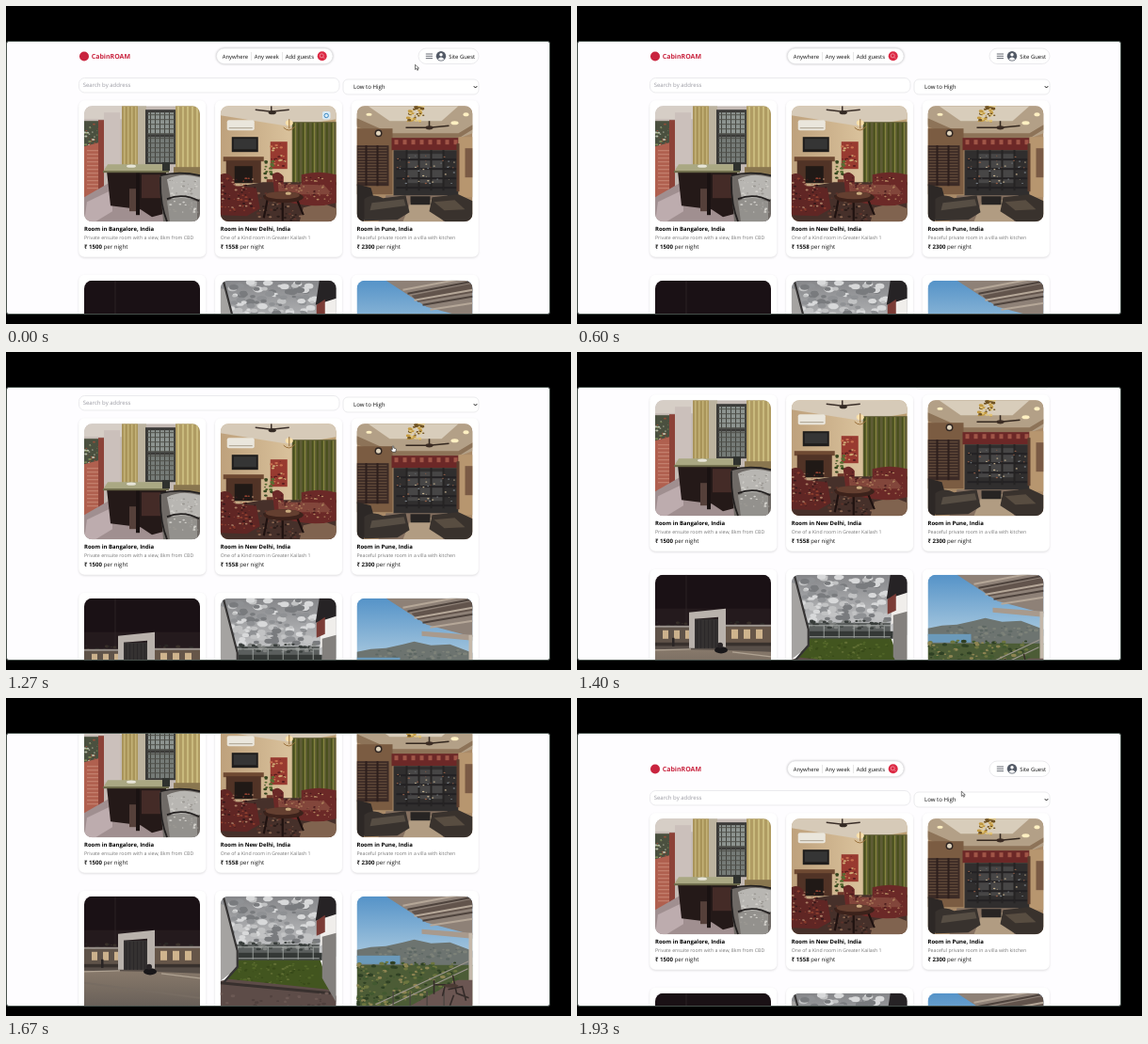
An HTML page that plays this animation: 600x338 px, repeating every 2000 ms.

```html
<!DOCTYPE html>
<html lang="en">
<head>
<meta charset="utf-8">
<title>Room listings</title>
<style>
html, body { margin: 0; width: 100%; height: 100%; overflow: hidden; background: #000; }
svg { display: block; width: 600px; height: 338px; }
text { font-family: "Open Sans", "Noto Sans", sans-serif; font-size: 6.1px; fill: #111; white-space: pre; text-rendering: geometricPrecision; }
.brand { font-size: 7px; font-weight: 700; fill: #c9243f; }
.nav { font-size: 5.9px; }
.hint { font-size: 6px; fill: #9a9aa2; }
.title { font-weight: 700; font-size: 5.95px; fill: #000; }
.note { font-size: 5.2px; fill: #777; }
.price tspan { font-weight: 700; }
.box { fill: #fff; stroke: #e2e2e6; stroke-width: .7; }
.soft { filter: drop-shadow(0 .7px 1px rgba(0, 0, 0, .25)); }
.card { fill: #fff; filter: drop-shadow(0 1px 1.2px rgba(0, 0, 0, .13)); }
</style>
</head>
<body>
<svg viewBox="0 0 600 338">
  <defs>
    <clipPath id="view"><rect x="1" y="38" width="576" height="289" rx="2"/></clipPath>
    <clipPath id="photo"><rect width="123" height="123" rx="8.5"/></clipPath>
    <linearGradient id="ground" x2="0" y2="1"><stop stop-color="#8a7b6c"/><stop offset="1" stop-color="#645c56"/></linearGradient>
    <linearGradient id="clouds" x2="0" y2="1"><stop stop-color="#858689"/><stop offset=".6" stop-color="#b0b1b3"/><stop offset="1" stop-color="#cfd0d1"/></linearGradient>
    <linearGradient id="blue" x2="0" y2="1"><stop stop-color="#5593c8"/><stop offset="1" stop-color="#a9c9df"/></linearGradient>
    <linearGradient id="cream" x2="1" y2="0"><stop stop-color="#bea17c"/><stop offset=".6" stop-color="#d9c19b"/><stop offset="1" stop-color="#b89b6e"/></linearGradient>
  </defs>
  <rect width="600" height="338"/>
  <rect x=".5" y="37.5" width="577" height="290" rx="2.5" fill="#fefdff" stroke="#46504b"/>
  <g clip-path="url(#view)">
    <g id="page">
      <circle cx="83" cy="53.5" r="5" fill="#c9243f"/>
      <text class="brand" x="90.7" y="56">CabinROAM</text>
      <rect class="box soft" x="223.5" y="45" width="123.5" height="16.5" rx="8.2"/>
      <path d="M260.5 49v9M293.5 49v9" stroke="#ddd" stroke-width=".7"/>
      <text class="nav" x="229.7" y="55.5">Anywhere</text>
      <text class="nav" x="263.7" y="55.5">Any week</text>
      <text class="nav" x="296.7" y="55.5">Add guests</text>
      <circle cx="335.7" cy="53.3" r="5" fill="#dc2944"/>
      <g fill="none" stroke="#f6a9b3" stroke-width=".7"><circle cx="335.3" cy="52.8" r="2"/><path d="M336.8 54.3l1.6 1.6"/></g>
      <rect class="box" x="438" y="45" width="64" height="16.5" rx="8.2"/>
      <path d="M445.8 51h7.2M445.8 53.3h7.2M445.8 55.6h7.2" stroke="#444a55" stroke-width=".8"/>
      <circle cx="462" cy="53.3" r="5.2" fill="#535a66"/>
      <circle cx="462" cy="51.7" r="1.7" fill="#fff"/>
      <path d="M458.6 56.4q3.4-3.8 6.8 0q-3.4 2.8-6.8 0" fill="#fff"/>
      <text class="nav" x="470.3" y="55.5">Site Guest</text>
      <rect class="box" x="77.5" y="76.5" width="276.5" height="15.5" rx="6"/>
      <text class="hint" x="81.7" y="86.4">Search by address</text>
      <rect class="box" x="358" y="78" width="144" height="16" rx="5"/>
      <text x="369" y="88.2">Low to High</text>
      <path d="M496.8 85.2l1.7 1.8 1.7-1.8" fill="none" stroke="#111" stroke-width="1"/>
      <g id="cards"></g>
      <g id="hover">
        <rect x="336" y="112" width="8.5" height="8.5" rx="2" fill="#d9eaf5"/>
        <circle cx="340.2" cy="116.5" r="2.2" fill="none" stroke="#3b88c0"/>
      </g>
    </g>
    <path id="arrow" d="M0 0v5.2l1.3-1.1 1 2 .9-.4-.9-2h1.7z" fill="#fff" stroke="#222" stroke-width=".6"/>
    <path id="hand" d="M-.7.6q.7-1.2 1.4 0v2l2.2.6q.7.3.5 1.2l-.7 2.4h-3.2l-2-2.6q.2-1 1.8 0z" fill="#fff" stroke="#222" stroke-width=".6"/>
  </g>
</svg>
<script>
const $ = id => document.getElementById(id);
const LOOP = 2000, STEPS = 30;

let seed = 7;
const rand = () => (seed = seed * 16807 % 2147483647) / 2147483647;

// Markup helpers for the room pictures, all in a 123 px square
const rect = (fill, x, y, w, h, rx = 0) =>
  `<rect x="${x}" y="${y}" width="${w}" height="${h}" rx="${rx}" fill="${fill}"/>`;
const shape = (fill, d) => `<path d="${d}" fill="${fill}"/>`;
const line = (stroke, d, w = 1) => `<path d="${d}" fill="none" stroke="${stroke}" stroke-width="${w}"/>`;
const oval = (fill, x, y, rx, ry = rx) => `<ellipse cx="${x}" cy="${y}" rx="${rx}" ry="${ry}" fill="${fill}"/>`;
const stripes = (fill, x, y, w, h, gap, size = 1) => {
  let out = '';
  for (let i = x; i < x + w; i += gap) out += rect(fill, i, y, size, h);
  return out;
};
const bars = (fill, x, y, w, h, gap, size = 1) => {
  let out = '';
  for (let i = y; i < y + h; i += gap) out += rect(fill, x, i, w, size);
  return out;
};
const specks = (fills, n, x, y, w, h, size) => {
  let out = '';
  for (let i = 0; i < n; i++) {
    const s = size * (.5 + rand());
    out += oval(fills[i % fills.length], x + rand() * w, y + rand() * h, s, s * .6);
  }
  return out;
};

const study = () => [
  rect('#c4bab4', 0, 0, 123, 123), rect('#d6cec6', 0, 0, 45, 14),
  rect('#4a503f', 0, 16, 17, 32), specks(['#7d8a58', '#b9bda9', '#934e39'], 30, 0, 18, 15, 28, 1.2),
  shape('#b0604f', 'M0 43L15 39L21 94L0 98z'), bars('#c98775', 3, 47, 14, 42, 4, 1),
  rect('#8c4238', 15, 15, 6, 74), rect('#cbc0bb', 21, 7, 17, 57),
  shape('#a08f90', 'M0 97L26 82H90V123H0z'), shape('#bdacae', 'M3 102L30 89V112L12 123H0z'),
  rect('#a9945a', 40, 0, 17, 64), stripes('#c3b177', 42, 0, 14, 64, 4, 1.5), rect('#bcb39f', 57, 0, 9, 63),
  rect('#3b3a38', 65, 4, 33, 58), rect('#8d9490', 68, 7, 27, 23), rect('#757b77', 68, 33, 27, 27),
  stripes('#444540', 70, 6, 26, 55, 5), bars('#50514b', 67, 9, 29, 50, 5),
  rect('#b09c63', 97, 0, 26, 75), stripes('#c9ba7d', 99, 0, 23, 75, 5, 2), rect('#89764f', 95, 65, 28, 12),
  shape('#241918', 'M24 69H87V114L72 118L60 110L28 106z'), rect('#442b27', 61, 73, 22, 25),
  rect('#55403a', 48, 88, 7, 24), rect('#1a1212', 55, 69, 4, 47),
  shape('#aaa883', 'M25 62H84L90 70H20z'), rect('#6a6848', 20, 69, 70, 2),
  oval('#e7e5d8', 50, 64, 5, 1.6), rect('#2f322e', 83, 60, 8, 9),
  shape('#6f6a66', 'M80 75Q95 69 123 73V123H84z'),
  shape('#b8b6b2', 'M88 78Q103 70 123 76V99H92z'), shape('#93918d', 'M88 101Q104 94 120 102V123H91z'),
  specks(['#d1cfca', '#9b9893'], 60, 91, 79, 30, 34, 1.1),
  line('#221f1f', 'M81 75Q80 103 88 123M81 74Q101 69 123 74M88 99Q105 92 122 101', 1.8)
];

const lounge = () => [
  rect('url(#cream)', 0, 0, 123, 123), shape('#d6cab8', 'M0 0H123V14L75 22L0 10z'),
  line('#3b2f29', 'M37 4L54 6L73 4M54 0V8', 1.5), oval('#332923', 55, 7, 4, 2),
  rect('#eae6dc', 7, 15, 29, 11, 2), rect('#a99e8d', 9, 23, 25, 1),
  rect('#1f1d1c', 12, 33, 28, 16), rect('#353535', 14, 35, 24, 11),
  rect('#6e4932', 3, 54, 43, 5), rect('#513326', 6, 58, 37, 24), rect('#201916', 15, 64, 19, 18),
  rect('#983a30', 53, 38, 18, 29), specks(['#c8704f', '#5a1d1e', '#cda873'], 24, 54, 40, 15, 24, 1.2),
  rect('#5e5c35', 76, 17, 47, 67), stripes('#484f1c', 77, 18, 45, 66, 5, 2), stripes('#85843f', 79, 18, 42, 65, 10, 1.4),
  oval('#f7dfab', 73, 18, 4, 3), line('#99713d', 'M67 23Q73 29 79 22M73 14V24'),
  specks(['#35461f', '#586c32'], 24, 47, 58, 9, 20, 1.4), rect('#6f382a', 49, 78, 7, 9),
  shape('#46302a', 'M0 89L45 81H123V123H0z'), shape('#80634f', 'M88 108L108 103L123 109V123H84z'),
  specks(['#2a1d1a', '#8a6751', '#5b322a'], 70, 20, 92, 66, 30, 1.4),
  shape('#6b2927', 'M55 73Q61 67 67 75V84H86V73Q104 68 123 73V103Q95 111 58 98z'),
  shape('#82463b', 'M61 83L110 84L119 94L62 94z'),
  specks(['#a06a50', '#481b1d', '#b1875f'], 80, 59, 76, 60, 25, 1),
  shape('#602624', 'M0 73Q12 68 16 85L38 87L42 109L28 117L0 116z'),
  specks(['#ab8066', '#35191a', '#91402f'], 75, 0, 77, 37, 36, 1.1),
  line('#1f1210', 'M50 99L46 119M81 99L88 116M66 100V122', 2.2),
  oval('#3c221b', 67, 97, 21, 6), oval('#643f30', 66, 95, 18, 4), oval('#cbad80', 72, 93, 3, 1.6)
];

const hall = () => [
  rect('#a98a68', 0, 0, 123, 123), shape('#b3a087', 'M0 0H123V29L104 36H36L0 20z'),
  shape('#d8cdbb', 'M12 0H108L90 16H35z'), shape('#8d7358', 'M0 13L36 29H108L123 20V25L107 35H36L0 22z'),
  oval('#fff0c2', 13, 9, 3, 1.5), oval('#fff0c2', 104, 18, 4, 2), oval('#fff0c2', 116, 9, 3, 2),
  rect('#7b5c42', 0, 24, 38, 70),
  rect('#3c2b26', 0, 42, 34, 43), bars('#69513f', 1, 44, 31, 38, 3), stripes('#2d1f1c', 9, 42, 20, 43, 12, 2),
  oval('#302622', 23, 29, 4), oval('#ded2bb', 23, 29, 2.5),
  rect('#6c2827', 37, 34, 71, 13), stripes('#a05547', 40, 36, 66, 5, 9, 4),
  rect('#302e2e', 39, 47, 69, 49), rect('#474646', 53, 51, 39, 31),
  bars('#232123', 42, 56, 64, 34, 10, 2), stripes('#252323', 52, 47, 52, 43, 13, 2),
  specks(['#c4b290', '#767d83', '#8f5d47'], 45, 43, 52, 61, 31, .9),
  rect('#b7966f', 108, 33, 15, 64), rect('#5d3e2e', 106, 40, 3, 51), rect('#7a5a45', 115, 45, 8, 31),
  line('#342820', 'M52 23L77 23L98 21M77 16V25', 1.6), oval('#3b2c24', 77, 23, 4, 2),
  specks(['#6f5222', '#c39a41', '#e0c479'], 42, 54, 0, 18, 17, 1.6),
  shape('#857060', 'M31 95H96L114 123H23z'), shape('#b19c82', 'M58 100H82L92 123H49z'),
  shape('#2d2826', 'M0 83L15 87L19 101L7 123H0z'),
  shape('#38322e', 'M8 99Q17 92 28 98L52 95L56 113L43 121L8 122z'), shape('#574e44', 'M16 103L50 99L52 106L14 111z'),
  shape('#39322d', 'M80 97L108 94L123 101V123H94L77 112z'), shape('#584d41', 'M82 102L104 100L115 110L93 111z'),
  shape('#272423', 'M57 96H78V105H57z')
];

const gate = () => [
  rect('#1a1115', 0, 0, 123, 123), shape('#241a1d', 'M0 36H123V60H0z'), line('#302629', 'M33 0V56', .8),
  specks(['#292624', '#382f29'], 36, 0, 50, 123, 7, 1.8),
  rect('#5f5349', 0, 56, 40, 20), rect('#665649', 73, 55, 50, 20),
  stripes('#cbb18c', 8, 59, 30, 9, 12, 6), stripes('#cfb48d', 81, 58, 36, 10, 13, 7),
  rect('#9b938c', 0, 54, 40, 2), rect('#9f9790', 73, 53, 50, 2), rect('#38312d', 0, 72, 123, 5),
  rect('url(#ground)', 0, 76, 123, 47), shape('#574e48', 'M0 76H123V82L68 80L0 79z'),
  line('#b0a393', 'M0 80L38 79M82 82L123 87', 1.2), line('#776c62', 'M0 92L123 108', 2),
  shape('#b9b2ac', 'M36 40L75 36V77H67V45L42 47V78H36z'),
  rect('#343131', 42, 47, 25, 31), stripes('#2a2728', 44, 48, 22, 30, 4, 1),
  oval('#191719', 70, 80, 7, 3.6), oval('#282426', 69, 75, 3, 3), rect('#292424', 18, 67, 2.5, 9)
];

const terrace = () => [
  rect('url(#clouds)', 0, 0, 123, 64),
  specks(['#797b7e', '#c2c3c4', '#d8d9da', '#8f9194'], 130, 8, 2, 96, 46, 3.6),
  rect('#5b5f5e', 15, 51, 90, 17), specks(['#383d3b', '#7f8280'], 60, 17, 49, 85, 8, 1.8),
  rect('#343836', 12, 60, 96, 8), shape('#42551f', 'M18 68H106L117 101L4 93z'),
  specks(['#526628', '#384a19', '#627035'], 90, 18, 70, 84, 24, 1.3),
  shape('#5d4c48', 'M0 90L9 88L114 99L123 106V123H0z'), line('#38302e', 'M0 92L117 103', 3),
  specks(['#6c5954', '#50413e'], 50, 0, 103, 123, 20, 1.6),
  line('#b0b4b2', 'M17 54H106M17 66H105', .9), stripes('#a1a6a3', 18, 54, 88, 13, 16, .9),
  shape('#a5a3a1', 'M0 8L5 10L18 60V76L0 90z'), line('#353333', 'M3 0L18 58V75L4 91', 2.2),
  shape('#f0eeeb', 'M112 0H123V43L106 53V25z'), shape('#262325', 'M105 0H123V19L101 26z'),
  shape('#7b3c36', 'M102 26L111 20V38L102 42z'), shape('#83807d', 'M108 43L123 39V113L108 87z')
];

const balcony = () => [
  rect('url(#blue)', 0, 0, 123, 65),
  shape('#6d7470', 'M0 57L15 54L31 53L49 49L61 46L79 50L99 49L123 58V74H0z'),
  specks(['#5d6763', '#7d8279'], 60, 20, 55, 95, 12, 1.8),
  rect('#6b9abb', 0, 63, 46, 9), rect('#4c5c36', 0, 73, 123, 50),
  specks(['#2f4024', '#6d763f', '#8e8552', '#425930'], 230, 0, 70, 109, 46, 2),
  shape('#8e8177', 'M31 0H123V41L74 28z'), shape('#62544c', 'M43 0H123V13L65 23L58 16L123 3V0z'),
  line('#b5a798', 'M49 10L123 -4M61 21L123 10M78 31L123 24', 2), line('#4e433d', 'M54 14L123 1M70 26L123 17', 2),
  shape('#a89a8d', 'M69 35L123 39V45L69 40z'), rect('#c3b7a9', 119, 39, 4, 80),
  shape('#6b5652', 'M45 123L107 89H123V123z'), line('#9b958d', 'M20 123L118 77M20 115L119 69', 1.2),
  stripes('#48433f', 38, 101, 72, 18, 18, 1.2),
  line('#342b29', 'M82 89V104M83 94H94L91 106M102 84L106 103L119 108M97 99L112 96L116 111M103 105L99 116', 1.6),
  oval('#4c3b34', 100, 95, 8, 2)
];

const rooms = [
  [study, 'Room in Bangalore, India', 'Private ensuite room with a view, 8km from CBD', 1500],
  [lounge, 'Room in New Delhi, India', 'One of a Kind room in Greater Kailash 1', 1558],
  [hall, 'Room in Pune, India', 'Peaceful private room in a villa with kitchen', 2300],
  [gate], [terrace], [balcony]
];

const card = ([draw, title, note, price], i) => {
  const x = 83 + i % 3 * 144.75, y = i < 3 ? 106.2 : 291.8;
  const label = title ? `<text class="title" y="133.3">${title}</text>
    <text class="note" y="141.7">${note}</text>
    <text class="price" y="152.2"><tspan>₹ ${price}</tspan> per night</text>` : '';
  return `<g transform="translate(${x} ${y})">
    <rect class="card" x="-5.7" y="-6" width="135" height="166.5" rx="6"/>
    <g clip-path="url(#photo)">${draw().join('')}</g>${label}</g>`;
};
$('cards').innerHTML = rooms.map(card).join('');

// [ms, page offset]
const scroll = [[1070, 0], [1130, -6], [1270, -30], [1400, -55], [1530, -74],
  [1670, -81], [1730, -62], [1800, -24], [1860, 8], [1930, 22]];

const at = (keys, t) => {
  if (t <= keys[0][0]) return keys[0][1];
  const n = keys.findIndex(k => k[0] >= t);
  if (n < 0) return keys[keys.length - 1][1];
  const [t0, a] = keys[n - 1], [t1, b] = keys[n];
  return a + (b - a) * (t - t0) / (t1 - t0);
};
const place = (el, show, x, y) => {
  el.style.display = show ? '' : 'none';
  el.setAttribute('transform', `translate(${x} ${y})`);
};
const stepTime = i => Math.round(i * LOOP / STEPS / 10) * 10;

function render(now) {
  const ms = now % LOOP;
  let i = Math.min(STEPS - 1, Math.ceil(ms * STEPS / LOOP));
  while (stepTime(i) > ms) i--;
  const t = stepTime(i);
  $('page').setAttribute('transform', `translate(0 ${at(scroll, t)})`);
  $('hover').style.display = t < 70 ? '' : 'none';
  const late = t >= 1860;
  place($('arrow'), t < 140 || late, late ? 408.3 : 434.5 - t * .06, late ? 99.2 : 62.3 + t * .2);
  place($('hand'), t >= 1000 && t < 1330, 411, 99.5);
}

const start = performance.now();
const tick = () => {
  render(performance.now() - start);
  requestAnimationFrame(tick);
};
tick();
</script>
</body>
</html>
```
